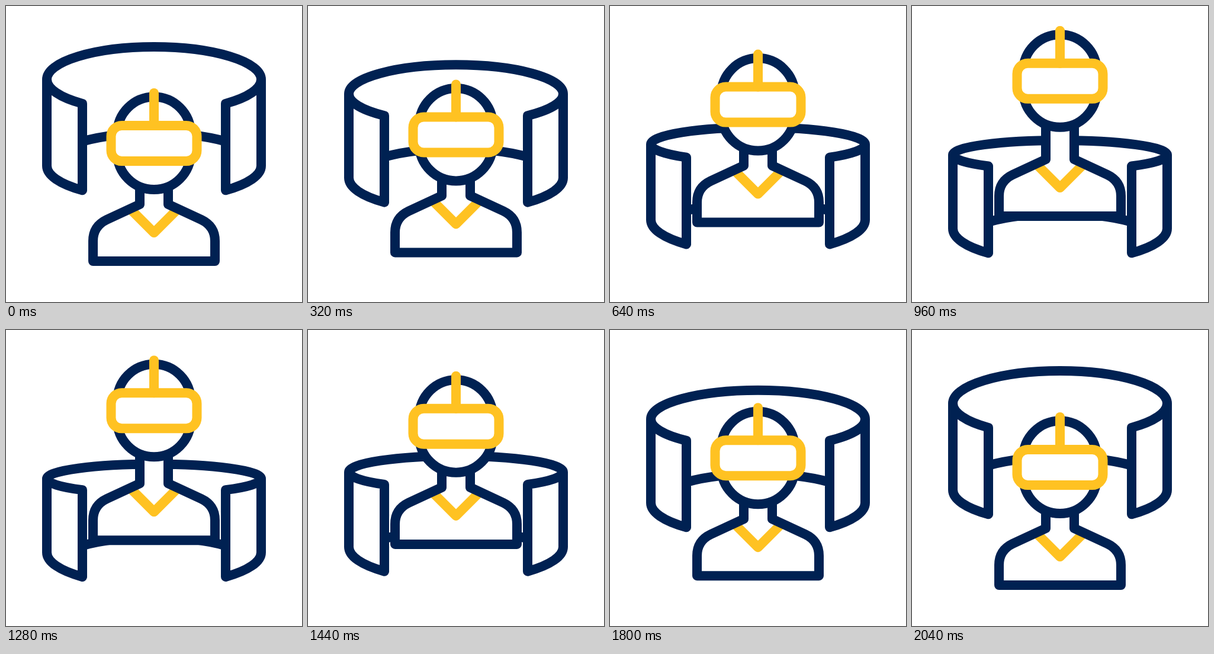
Recreate the animation shown at these times as an HTML page. Size 500 by 500 pixels, loop 2120 ms.

```html
<!DOCTYPE html>
<html lang="en">
<head>
<meta charset="utf-8">
<title>Headset</title>
<style>
  html, body { margin: 0; width: 100%; height: 100%; overflow: hidden; background: #fff; }
  svg { display: block; width: 100%; height: 100%; }
  path, rect {
    fill: none; stroke: #002152; stroke-width: 16;
    stroke-linecap: round; stroke-linejoin: round;
  }
  .solid { fill: #fff; }
  .gold { stroke: #ffc222; }
  .flat { stroke-linecap: butt; }
</style>
</head>
<body>
<svg viewBox="0 0 500 500">
  <path id="screen" class="flat"/>
  <g id="body">
    <path class="solid" style="stroke:none" d="M226 270V335L170 361Q147 372 147 397V431H353V397Q353 372 330 361L274 335V270Z"/>
    <path class="gold flat" d="M212 345L250 383L288 345"/>
    <path d="M226 270V335L170 361Q147 372 147 397V431H353V397Q353 372 330 361L274 335V270"/>
  </g>
  <g id="head">
    <rect class="solid" x="188" y="153.5" width="124" height="156.5" rx="62"/>
    <rect class="solid gold" x="177.5" y="202" width="145" height="60" rx="18"/>
    <path class="gold" d="M250 147V202"/>
  </g>
</svg>
<script>
  const LOOP = 2120, STEP = 40, LAST = 50;
  const LEFT = 69, RIGHT = 431, INNER_L = 129, INNER_R = 371, RX = 181, LOW_R = 55.5;
  const DEPTH = Math.sqrt(1 - ((250 - INNER_L) / RX) ** 2);
  const [screenEl, bodyEl, headEl] = ['screen', 'body', 'head'].map(id => document.getElementById(id));

  // cubic-bezier(.53, 0, .57, 1), solved by bisection
  function ease(x) {
    if (x <= 0) return 0;
    if (x >= 1) return 1;
    let lo = 0, hi = 1, t = 0.5;
    for (let i = 0; i < 24; i++) {
      t = (lo + hi) / 2;
      const u = 1 - t;
      if (3 * u * u * t * 0.53 + 3 * u * t * t * 0.57 + t * t * t < x) lo = t;
      else hi = t;
    }
    return t * t * (3 - 2 * t);
  }

  const ramp = (k, from, to) => ease((k - from) / (to - from));

  // The upper rim flattens as it sinks; the lower curves keep their shape.
  function screenPath(p) {
    const topY = 124 + 127.5 * p, backR = 55 - 30.5 * p, frontR = 55 - 29.5 * p;
    const lowY = 270 + 106 * p;
    const topFront = topY + frontR * DEPTH;
    const lowFront = lowY + LOW_R * DEPTH;
    const lowBack = 270 + 136 * p - LOW_R * DEPTH;
    const arc = (r, sweep, x, y) => `A${RX} ${r} 0 0 ${sweep} ${x} ${y}`;
    return `M${INNER_L} ${lowBack}` + arc(LOW_R, 1, INNER_R, lowBack) +
      `M${LEFT} ${topY}V${lowY}` + arc(LOW_R, 0, INNER_L, lowFront) +
      `V${topFront}` + arc(frontR, 1, LEFT, topY) +
      arc(backR, 1, 250, topY - backR) + arc(backR, 1, RIGHT, topY) +
      arc(frontR, 1, INNER_R, topFront) +
      `V${lowFront}` + arc(LOW_R, 0, RIGHT, lowY) + `V${topY}`;
  }

  function draw(now) {
    const k = Math.min(LAST, Math.max(0, Math.floor((now % LOOP) / STEP) - 1));
    const p = ramp(k, 0, 20) - ramp(k, 30, 50);
    const stretch = ramp(k, 15, 25) - ramp(k, 27, 35.5);
    const lift = -76 * p;
    screenEl.setAttribute('d', screenPath(p));
    bodyEl.setAttribute('transform', `translate(0 ${lift})`);
    headEl.setAttribute('transform', `translate(0 ${lift - 32 * stretch})`);
  }

  function tick() {
    draw(performance.now());
    requestAnimationFrame(tick);
  }
  tick();
</script>
</body>
</html>
```
